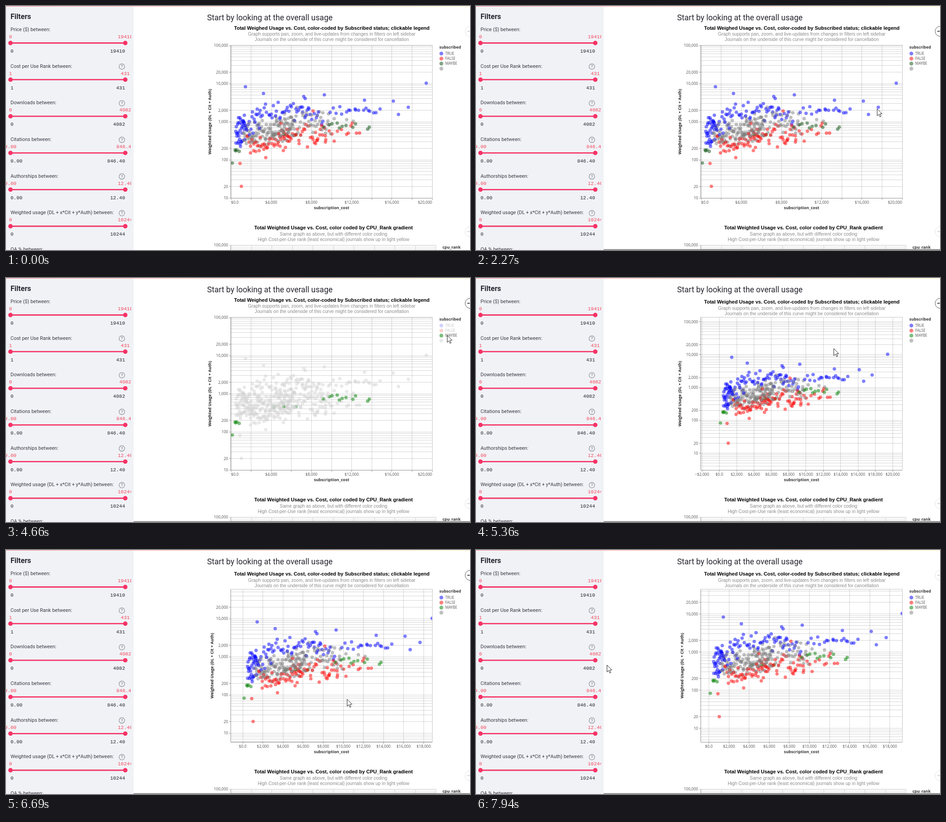
These frames come from a looping animation (1029 px wide and 544 px high, 8000 ms). An HTML page with a canvas:

```html
<!DOCTYPE html>
<html lang="en">
<head>
<meta charset="utf-8">
<title>Usage dashboard</title>
<style>
  html, body { margin: 0; width: 100%; height: 100%; overflow: hidden; background: #fff; }
  canvas { display: block; width: 1029px; height: 544px; }
</style>
</head>
<body>
<canvas id="stage" width="1029" height="544"></canvas>
<script>
const ctx = document.getElementById('stage').getContext('2d');
const LOOP = 8000;
const STEP = 78;
const PLOT = { left: 499, right: 945, top: 88, bottom: 428 };
const PINK = '#f63366';
const SANS = 'Roboto, sans-serif';
const AXIS = '"Open Sans", sans-serif';
const TITLE = '"Liberation Sans", Arial, sans-serif';
const MONO = '"Liberation Mono", monospace';
const KINDS = ['TRUE', 'FALSE', 'MAYBE', ''];
const [BLUE, RED, GREEN, GRAY] = [0, 1, 2, 3];

/* ---------- helpers ---------- */
function text(str, x, y, size, family, color, align = 'left', weight = 400) {
  ctx.font = `${weight} ${size}px ${family}`;
  ctx.fillStyle = color;
  ctx.textAlign = align;
  ctx.fillText(str, x, y + size * 0.36);
}
function line(x1, y1, x2, y2, color, width = 1) {
  ctx.strokeStyle = color;
  ctx.lineWidth = width;
  ctx.beginPath();
  ctx.moveTo(x1, y1);
  ctx.lineTo(x2, y2);
  ctx.stroke();
}
function disc(x, y, r, color) {
  ctx.fillStyle = color;
  ctx.beginPath();
  ctx.arc(x, y, r, 0, Math.PI * 2);
  ctx.fill();
}
function ring(x, y, r, color, width) {
  ctx.strokeStyle = color;
  ctx.lineWidth = width;
  ctx.beginPath();
  ctx.arc(x, y, r, 0, Math.PI * 2);
  ctx.stroke();
}
const crisp = v => Math.floor(v) + 0.5;
const clamp = (v, low, high) => Math.min(high, Math.max(low, v));
const costToX = cost => PLOT.left + cost * (PLOT.right - PLOT.left) / 20000;
const usageToY = usage => PLOT.bottom - 85 * (Math.log10(usage) - 1);

/* ---------- journals ---------- */
let seed = 20;
function rand() {
  seed = (seed + 0x6D2B79F5) | 0;
  let h = Math.imul(seed ^ (seed >>> 15), 1 | seed);
  h = (h + Math.imul(h ^ (h >>> 7), 61 | h)) ^ h;
  return ((h ^ (h >>> 14)) >>> 0) / 4294967296;
}
const spread = () => rand() + rand() + rand() - 1.5;

const points = [];
const add = (kind, x, y) => points.push({ kind, x, y, order: rand() });

// a sloped band of points from one end to the other, blurred vertically
function band(kind, count, [x0, y0], [x1, y1], blur) {
  for (let i = 0; i < count; i++) {
    const u = (i + rand()) / count;
    add(kind, x0 + (x1 - x0) * u, y0 + (y1 - y0) * u + spread() * blur);
  }
}
band(BLUE, 28, [509, 288], [530, 278], 36);
band(BLUE, 24, [513, 264], [562, 258], 26);
band(BLUE, 38, [556, 238], [672, 228], 26);
band(BLUE, 12, [655, 236], [705, 246], 16);
band(BLUE, 18, [718, 238], [832, 230], 12);
band(RED, 42, [533, 316], [630, 294], 24);
band(RED, 36, [605, 294], [712, 288], 28);
band(RED, 14, [680, 300], [788, 278], 20);
band(GRAY, 118, [526, 290], [640, 270], 26);
band(GRAY, 56, [595, 268], [720, 262], 32);
band(GRAY, 4, [700, 246], [775, 256], 8);
band(GREEN, 4, [506, 322], [518, 326], 4);
band(GREEN, 3, [574, 289], [644, 287], 3);
band(GREEN, 9, [703, 264], [778, 270], 8);

// the few that stand apart
for (const [x, y] of [[531, 180], [571, 195], [706, 198], [932, 172], [859, 212], [795, 210]]) add(BLUE, x, y);
for (const [x, y] of [[522, 402], [519, 351], [576, 338], [681, 234], [768, 261]]) add(RED, x, y);
add(GREEN, 502, 350);

function journal(name, kind, usage, cost, citations, authorships, rank) {
  const x = costToX(cost), y = usageToY(usage);
  const downloads = Math.round(usage - 9.96 * citations - 100 * authorships);
  add(kind, x, y);
  return {
    name, x, y,
    rows: { downloads, citations, authorships: authorships.toFixed(1), usage,
      subscription_cost: cost, cpu_rank: rank, subscribed: KINDS[kind] }
  };
}
const abstracts = journal('Marrowfield Abstracts', GREEN, 640, 13590, 20.1, 0.2, 371);
const quarterly = journal('Hollowmere Quarterly', GREEN, 721, 13755, 18.6, 0.4, 362);
const studies = journal('Tidewick Studies', BLUE, 1551, 16652, 25.4, 1, 298);
const annals = journal('Amberlow Annals', BLUE, 2394, 17630, 34.8, 0.6, 266);
points.sort((a, b) => a.order - b.order);

/* ---------- timeline ---------- */
const LEGEND = { x: 978, y: 105, row: 11.2 };
const ZOOM_AT = { x: 793, y: 157 };
const GRAB = { x: 730, y: 352, from: 6600, to: 7300 };
const CLICKS = [3820, 4270, 4660]; // one per legend row, top down
const CLEARED = 5130;

const path = [];
const glide = (start, end, x, y) => path.push({ start, end, x, y });
glide(70, 790, abstracts.x + 1, abstracts.y + 1);
glide(1170, 1170, quarterly.x + 1, quarterly.y + 1);
glide(1250, 1730, studies.x - 2, studies.y + 1);
glide(2040, 2270, annals.x - 3, annals.y + 3);
glide(2420, 2500, annals.x, annals.y);
glide(3110, 3580, LEGEND.x, LEGEND.y);
glide(3900, 3980, LEGEND.x, LEGEND.y + LEGEND.row);
glide(4350, 4430, LEGEND.x, LEGEND.y + LEGEND.row * 2);
glide(4740, 5210, ZOOM_AT.x, ZOOM_AT.y);
glide(5990, 6450, GRAB.x + 8, GRAB.y);
glide(6600, 7010, GRAB.x + 62, GRAB.y - 59);
glide(7080, 7240, GRAB.x + 17.5, GRAB.y - 30.5);
glide(7400, 7940, 290, 256);

// the pointer jumps at the screen rhythm, the first jump falling on the start time
function cursorAt(t) {
  let pos = { x: 660, y: 570 };
  for (const { start, end, x, y } of path) {
    if (t < start) break;
    const gaps = Math.round((end - start) / STEP);
    const done = gaps ? Math.floor((t - start) / (end - start) * gaps + 0.001) : 0;
    const p = Math.min(1, (done + 1) / (gaps + 1));
    pos = { x: pos.x + (x - pos.x) * p, y: pos.y + (y - pos.y) * p };
  }
  return pos;
}
function zoomAt(t) {
  if (t < 5360 || t >= 5820) return 1;
  if (t >= 5750) return 0.95;
  return 0.862 * 0.93 ** Math.min(2, Math.floor((t - 5360) / 80));
}
function hoveredAt(t) {
  if (t >= 790 && t < 1170) return abstracts;
  if (t >= 1170 && t < 1250) return quarterly;
  if (t >= 1730 && t < 2040) return studies;
  if (t >= 2500 && t < 3110) return annals;
  return null;
}
function viewAt(t) {
  const zoom = zoomAt(t);
  const dragged = t >= GRAB.from;
  const hand = dragged ? cursorAt(Math.min(t, GRAB.to)) : GRAB;
  return {
    home: zoom === 1 && !dragged,
    x: px => ZOOM_AT.x + (px - ZOOM_AT.x) * zoom + hand.x - GRAB.x,
    y: py => ZOOM_AT.y + (py - ZOOM_AT.y) * zoom + hand.y - GRAB.y
  };
}

/* ---------- sidebar ---------- */
const FILTERS = [
  ['Price ($) between:', '0', '19410'],
  ['Cost per Use Rank between:', '1', '431'],
  ['Downloads between:', '0', '4082'],
  ['Citations between:', '0.00', '846.40'],
  ['Authorships between:', '0.00', '12.40'],
  ['Weighted usage (DL + x*Cit + y*Auth) between:', '0', '10244']
];
function drawSidebar() {
  ctx.fillStyle = '#f0f2f6';
  ctx.fillRect(0, 0, 283, 544);
  ctx.save();
  ctx.beginPath();
  ctx.rect(0, 0, 278, 544);
  ctx.clip();
  text('Filters', 10, 22.8, 16.1, SANS, '#262730', 'left', 700);
  FILTERS.forEach(([label, low, high], i) => {
    const y = 52 + i * 81.7;
    text(label, 10, y, 11, SANS, '#3a3b44');
    text(low, 10, y + 16, 11, MONO, '#f4485c', 'center');
    text(high, 264.5, y + 16, 11, MONO, '#f4485c', 'center');
    line(10, y + 30.5, 264, y + 30.5, PINK, 2.8);
    disc(10, y + 30.5, 4.9, PINK);
    disc(264.5, y + 30.5, 4.9, PINK);
    text(low, 10, y + 48, 11, MONO, '#262730');
    text(high, 264, y + 48, 11, MONO, '#262730', 'right');
    if (i) {
      ring(257, y + 1.3, 6.2, '#8a8c94', 1.2);
      text('?', 257, y + 1.3, 9.5, SANS, '#8a8c94', 'center', 500);
    }
  });
  text('OA % between:', 10, 542.5, 11, SANS, '#3a3b44');
  ctx.restore();
}

/* ---------- charts ---------- */
const GRID = 'rgba(0,0,0,0.17)', TICK = '#8f8f8f', LABEL = '#555';

function drawTitles(x, y, lines) {
  text(lines[0], x, y, 11.07, TITLE, '#000', 'center', 700);
  text(lines[1], x, y + 13.5, 10.23, TITLE, '#8c8c8c', 'center');
  text(lines[2], x, y + 25.7, 10.23, TITLE, '#8c8c8c', 'center');
}
function drawCostAxis(view, fresh) {
  const { left, right, top, bottom } = PLOT;
  for (let v = -20000; v <= 40000; v += 2000) {
    const x = view.x(costToX(v));
    if (x < left - 0.5 || x > right + 0.5 || (!fresh && view.home && v === 20000)) continue;
    line(crisp(x), top, crisp(x), bottom, GRID);
    line(crisp(x), bottom, crisp(x), bottom + 4, TICK);
    if (fresh && v % 4000) continue;
    const label = v === 0 ? '$0.0' : (v < 0 ? '−$' : '$') + Math.abs(v).toLocaleString('en-US');
    const align = x < left + 1 ? 'left' : x > right - 1 ? 'right' : 'center';
    text(label, x, 438, 8.6, AXIS, LABEL, align);
  }
  text('subscription_cost', 722, 450, 9, AXIS, '#333', 'center', 700);
}
// returns the topmost labelled value and its height, which shift the titles
function drawUsageAxis(view) {
  const { left, right, top, bottom } = PLOT;
  let peak = { v: 0, y: bottom };
  for (let decade = 0; decade < 6; decade++) {
    for (let m = 1; m < 10; m++) {
      const v = m * 10 ** decade;
      const y = view.y(usageToY(v));
      if (y < top - 0.5 || y > bottom + 0.5) continue;
      line(left, crisp(y), right, crisp(y), GRID);
      if (m > 2 || v < 10) continue;
      line(left - 4, crisp(y), left, crisp(y), TICK);
      text(v.toLocaleString('en-US'), 492.5, y, 8.6, AXIS, LABEL, 'right');
      peak = { v, y };
    }
  }
  ctx.save();
  ctx.translate(peak.v >= 100000 ? 451.5 : 456.5, 258);
  ctx.rotate(-Math.PI / 2);
  text('Weighted Usage (DL + Cit + Auth)', 0, 0, 9, AXIS, '#222', 'center', 700);
  ctx.restore();
  return peak;
}
function drawMainChart(view, fresh, selected, colors) {
  const { left, right, top, bottom } = PLOT;
  drawCostAxis(view, fresh);
  const peak = drawUsageAxis(view);
  ctx.strokeStyle = '#c4c4c4';
  ctx.lineWidth = 1;
  ctx.strokeRect(left - 0.5, top - 0.5, right - left + 1, bottom - top + 1);
  line(left - 0.5, top, left - 0.5, bottom, TICK);
  line(left, bottom + 0.5, right, bottom + 0.5, TICK);

  drawTitles(722.5, 53.5 - Math.max(0, 4.5 - (peak.y - top)), [
    'Total Weighed Usage vs. Cost, color-coded by Subscribed status; clickable legend',
    'Graph supports pan, zoom, and live-updates from changes in filters on left sidebar',
    'Journals on the underside of this curve might be considered for cancellation'
  ]);

  ctx.save();
  ctx.beginPath();
  ctx.rect(left, top, right - left, bottom - top);
  ctx.clip();
  ctx.globalAlpha = 0.5;
  for (const p of points) {
    const lit = selected < 0 || p.kind === selected;
    disc(clamp(view.x(p.x), left, right), view.y(p.y), 3.8, lit ? colors[p.kind] : '#d3d3d3');
  }
  ctx.restore();
}
function drawLegend(selected, colors) {
  text('subscribed', 961, 92, 8.9, AXIS, '#333', 'left', 700);
  KINDS.forEach((name, i) => {
    const y = 106 + i * LEGEND.row;
    const fade = selected < 0 || i === selected ? 1 : 0.35;
    ctx.globalAlpha = 0.5 * fade;
    disc(965.5, y, 4.3, colors[i]);
    ctx.globalAlpha = fade;
    text(name, 974, y, 8.2, AXIS, LABEL);
    ctx.globalAlpha = 1;
  });
}
function drawSecondChart() {
  drawTitles(726.3, 494.5, [
    'Total Weighted Usage vs. Cost, color coded by CPU_Rank gradient',
    'Same graph as above, but with different color coding',
    'High Cost-per-Use rank (least economical) journals show up in light yellow'
  ]);
  text('100,000', 492.5, 533, 8.6, AXIS, LABEL, 'right');
  line(495, 533.5, 954, 533.5, '#c4c4c4');
  for (const y of [537.5, 541.5]) line(499, y, 954, y, '#dadada');
  for (let i = 0; i <= 10; i++) {
    const x = crisp(498.5 + i * 45.5);
    line(x, 533, x, 544, i ? '#d4d4d4' : TICK);
  }
  text('cpu_rank', 968, 538, 8.9, AXIS, '#333', 'left', 700);
}
function drawMenu(y, active) {
  ring(1029.5, y, 11.3, active ? '#555' : '#e2e2e2', 1);
  for (const x of [1025, 1029]) disc(x, y, 1.4, active ? '#222' : '#c8c8c8');
}

/* ---------- overlays ---------- */
function drawTooltip({ name, rows }, cursor) {
  const values = Object.values(rows);
  ctx.font = `400 8.8px ${AXIS}`;
  const valueWidth = Math.max(...values.map(v => ctx.measureText(v).width));
  ctx.font = `400 10.7px ${AXIS}`;
  const width = Math.max(88 + valueWidth + 9, ctx.measureText(name).width + 16);
  const x = cursor.x + 8, y = cursor.y + 10;
  ctx.save();
  ctx.shadowColor = 'rgba(0,0,0,0.14)';
  ctx.shadowBlur = 4;
  ctx.shadowOffsetX = ctx.shadowOffsetY = 1;
  ctx.fillStyle = 'rgba(255,255,255,0.96)';
  ctx.beginPath();
  ctx.roundRect(x, y, width, 164, 2);
  ctx.fill();
  ctx.restore();
  ctx.strokeStyle = '#e2e2e2';
  ctx.lineWidth = 0.8;
  ctx.stroke();
  text(name, x + 7, y + 17, 10.7, AXIS, '#444');
  Object.keys(rows).forEach((key, i) => {
    const rowY = y + 42 + i * 17.7;
    text(key + ':', x + 83, rowY, 8.8, AXIS, '#808080', 'right');
    text(values[i], x + 88, rowY, 8.8, AXIS, '#222');
  });
}
function drawCursor({ x, y }) {
  const arrow = 'M0 0V15.5L3.6 12.2L6.2 17.8L8.6 16.7L6.1 11.3L10.8 11Z';
  const shape = new Path2D(arrow);
  ctx.save();
  ctx.translate(x + 0.5, y + 0.5);
  ctx.fillStyle = '#fff';
  ctx.fill(shape);
  ctx.strokeStyle = '#222';
  ctx.lineWidth = 1;
  ctx.stroke(shape);
  ctx.restore();
}

function draw(t) {
  const active = t >= 70;
  const cursor = cursorAt(t);
  const clicks = CLICKS.filter(click => t >= click).length;
  const selected = t < CLEARED ? clicks - 1 : -1;
  const colors = ['blue', 'red', clicks ? '#008000' : '#0a5010', 'gray'];

  ctx.fillStyle = '#fff';
  ctx.fillRect(0, 0, 1029, 544);
  drawSidebar();
  text('Start by looking at the overall usage', 446, 25.2, 17.6, SANS, '#262730');
  drawMainChart(viewAt(t), t < 5360, selected, colors);
  drawLegend(selected, colors);
  drawSecondChart();
  drawMenu(56.5, t >= 310 && t < 7780);
  drawMenu(503, false);

  const strip = ctx.createLinearGradient(0, 0, 1029, 0);
  strip.addColorStop(0, '#ff8080');
  strip.addColorStop(1, '#fff0b0');
  ctx.fillStyle = strip;
  ctx.fillRect(0, 0, 1029, 1);

  if (active) {
    ctx.fillStyle = '#929292';
    ctx.fillRect(283, 542, 746, 2);
    const hovered = hoveredAt(t);
    if (hovered) drawTooltip(hovered, cursor);
    drawCursor(cursor);
  }
}

const began = performance.now();
function frame() {
  draw((performance.now() - began) % LOOP);
  requestAnimationFrame(frame);
}
frame();
</script>
</body>
</html>
```
